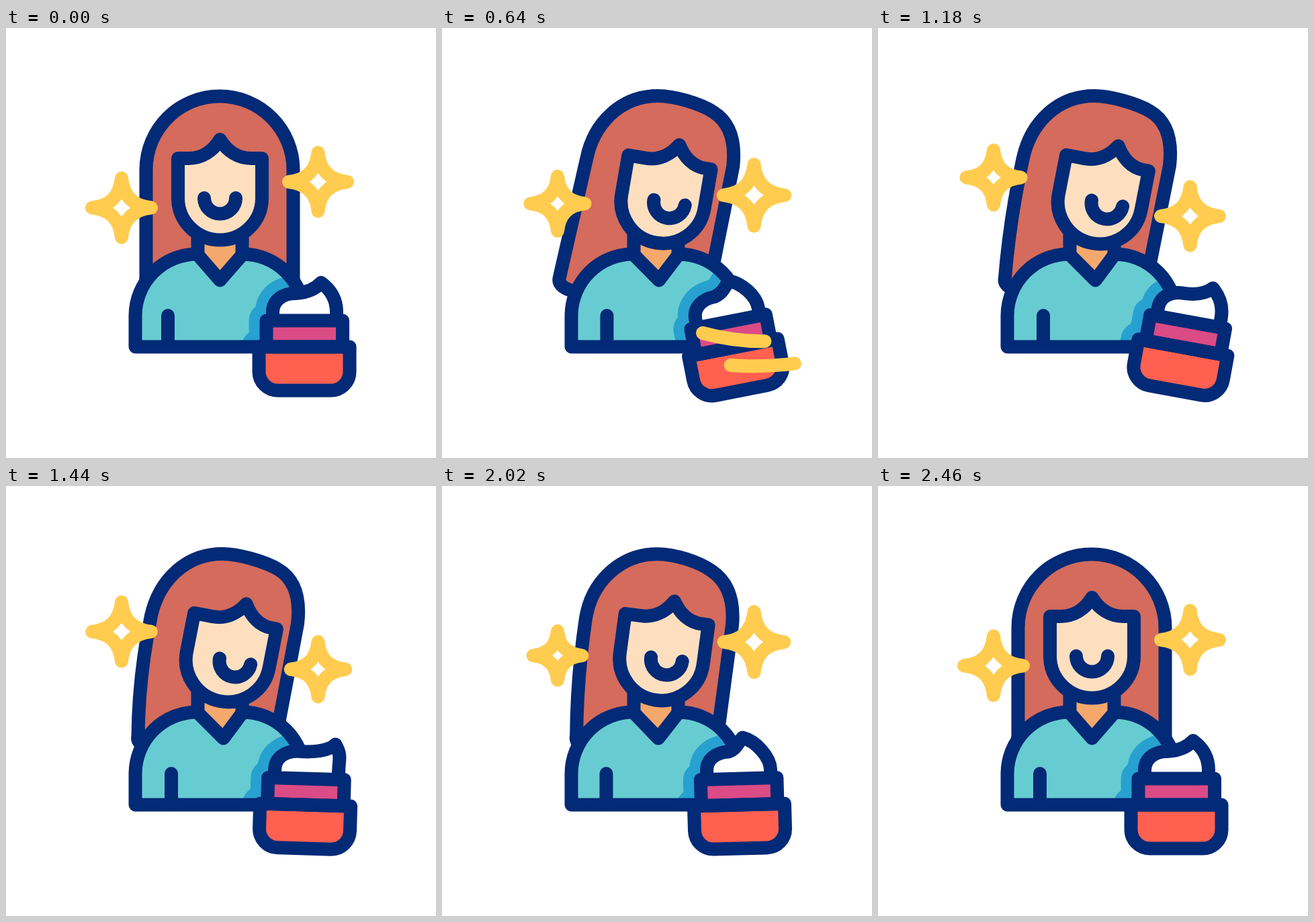
These frames come from a looping animation (640 by 640 pixels, 3000 ms). An HTML page:

```html
<!DOCTYPE html>
<html lang="en">
<head>
<meta charset="utf-8">
<title>Skin care</title>
<style>
html, body { margin: 0; width: 100%; height: 100%; overflow: hidden; background: #fff; }
svg { display: block; width: 100vw; height: 100vh; }
</style>
</head>
<body>
<svg viewBox="0 0 640 640" fill="none" stroke="#032a76" stroke-width="20" stroke-linecap="round" stroke-linejoin="round">
  <defs>
    <clipPath id="shirtClip"><path id="shirtArea"/></clipPath>
    <g id="jarLines">
      <path id="creamLine"/>
      <path d="M387.5 435.5H501V474.5H387.5Z"/>
      <path d="M376.5 474.5H511.5V511.5a28 28 0 0 1 -28 28H404.5a28 28 0 0 1 -28 -28Z"/>
    </g>
  </defs>

  <path id="hair" fill="#d46b5c"/>

  <path id="neck" fill="#f5a86b" stroke="none"/>
  <path d="M285.5 306V336M351.5 306V336"/>

  <g id="head">
    <path id="face" fill="#fddfbf"/>
    <path id="smile" d="M295 253a23.5 23.5 0 0 0 47 0"/>
  </g>

  <path id="shirt" fill="#67ccd1" stroke="none"/>
  <g clip-path="url(#shirtClip)">
    <use id="shade" href="#jarLines" stroke="#27a1cf" stroke-width="52"/>
  </g>
  <path id="shirtLine"/>
  <path id="arm"/>

  <g id="jar">
    <path id="cream" fill="#fff" stroke="none"/>
    <path d="M387.5 435.5H501V474.5H387.5Z" fill="#db4b86" stroke="none"/>
    <path d="M376.5 474.5H511.5V511.5a28 28 0 0 1 -28 28H404.5a28 28 0 0 1 -28 -28Z" fill="#ff6050" stroke="none"/>
    <use href="#jarLines"/>
  </g>

  <g stroke="#ffcc50">
    <path id="starL" fill="#fff"/>
    <path id="starR" fill="#fff"/>
    <path id="swipeA" pathLength="1" d="M560 455Q475 478 388 454"/>
    <path id="swipeB" pathLength="1" d="M534 498Q470 508 400 499"/>
  </g>
</svg>
<script>
const LOOP = 3000;
const $ = id => document.getElementById(id);
const set = (id, d) => $(id).setAttribute('d', d);
const turn = (id, deg, x, y) => $(id).setAttribute('transform', `rotate(${deg} ${x} ${y})`);
const ease = p => (1 - Math.cos(Math.PI * Math.min(1, Math.max(0, p)))) / 2;
const ramp = (t, from, to) => ease((t - from) / (to - from));

// Eased value through [time, value] keys
function track(t, keys) {
  let v = keys[0][1];
  for (let i = 1; i < keys.length; i++) {
    const [t0, v0] = keys[i - 1], [t1, v1] = keys[i];
    if (t > t0) v = v0 + (v1 - v0) * ramp(t, t0, t1);
  }
  return v;
}

const HAIR_REST = [208.5,211, 208.5,150.5, 257.5,101.5, 318,101.5, 347,101.5, 375,113.1, 395.4,133.6, 415.9,154.1, 427.5,182, 427.5,211];
const HAIR_TILT = [216,193, 228,140, 268,101, 322,101, 345,101, 385,112, 405,124, 432,140, 438,170, 434,205];

function drawHead(t) {
  const k = track(t, [[220, 0], [760, 1], [1820, 1], [2360, 0]]);
  const swing = track(t, [[220, 0], [740, -37], [1440, -12], [1820, -12], [2360, 0]]);
  const lag = swing + 37 * k;

  const p = HAIR_REST.map((v, i) => v + (HAIR_TILT[i] - v) * k);
  const ex = 208.5 + swing;
  const mx = (p[0] + ex) / 2 - 0.35 * lag, my = (p[1] + 372) / 2;
  const rx = 427.5 - 26 * k + 0.2 * lag;
  set('hair', `M${ex + 18} 391Q${ex - 3} 384 ${ex} 372Q${mx} ${my} ${p[0]} ${p[1]}`
    + `C${p.slice(2, 8)}C${p.slice(8, 14)}C${p.slice(14)}L${rx} 350L${rx - 8 * k} 385`);

  turn('head', 11 * k, 294, 317);
  const s = 11 * k;
  set('face', `M256 194H${272 + s}C${292 + s} 194 ${308 + s} 183 ${318.5 + s} 166`
    + `C${329 + s} 183 ${345 + 0.9 * s} 194 ${365 + 0.7 * s} 194H381V253A62.5 62.5 0 0 1 256 253Z`);
  $('smile').setAttribute('transform', `translate(${s} 0)`);

  const vx = 318.5 + 5 * k;
  const body = `M192.5 474.5V428A92 92 0 0 1 284.5 336.5L${vx} 375.5L352.5 336.5A92 92 0 0 1 444 428V474.5Z`;
  for (const id of ['shirt', 'shirtArea', 'shirtLine']) set(id, body);
  set('neck', `M285.5 306H351.5V336L${vx} 375.5L285.5 336Z`);
  set('arm', `M${241 + 5 * k} 428V470`);
}

function drawJar(t) {
  const a = track(t, [[220, 0], [700, -11.5], [1240, 11], [1660, -9], [2160, 0]]);
  const dx = track(t, [[220, 0], [800, -15], [880, -15], [1440, 17], [1960, -18], [2460, 0]]);
  const x = 469 + dx, y = 379 + 0.25 * dx;
  const d = `M397 435V423C397 406 411 395 431 395`
    + `C${447 + 0.3 * dx} ${394 + 0.15 * dx} ${x - 9} ${y + 10} ${x} ${y}`
    + `C${x + 15 - 0.3 * dx} ${y + 11 + 0.3 * dx} 492 405 492 423V435`;
  set('cream', d);
  set('creamLine', d);
  turn('jar', a, 444, 530);
  turn('shade', a, 444, 530);
}

function star(id, cx, cy, r) {
  const k = r / 44, a = 3 * k, b = 17 * k;
  const pt = (x, y) => `${cx + x} ${cy + y} `;
  set(id, 'M' + pt(0, -r)
    + 'C' + pt(a, -b) + pt(b, -a) + pt(r, 0)
    + 'C' + pt(b, a) + pt(a, b) + pt(0, r)
    + 'C' + pt(-a, b) + pt(-b, a) + pt(-r, 0)
    + 'C' + pt(-b, -a) + pt(-a, -b) + pt(0, -r) + 'Z');
}

// There and back, 980 ms each way
const bob = (t, from) => ramp(t, from, from + 980) - ramp(t, from + 980, from + 1960);

function drawStars(t) {
  const l = bob(t, 420), r = bob(t, 220);
  star('starL', 172, 267.5 - 51 * l, 44 - 9.5 * Math.sin(Math.PI * l));
  star('starR', 464.5, 229 + 51 * r, 43.5 + 3.5 * Math.sin(2 * Math.PI * r));
}

function swipe(id, head, tail) {
  const el = $(id), on = head > 0 && tail < 1;
  el.style.display = on ? '' : 'none';
  el.setAttribute('stroke-dasharray', `${Math.max(0.002, head - tail)} 3`);
  el.setAttribute('stroke-dashoffset', -tail);
}

function draw(t) {
  drawHead(t);
  drawJar(t);
  drawStars(t);
  swipe('swipeA', ramp(t, 240, 490), ramp(t, 460, 840));
  swipe('swipeB', ramp(t, 400, 750), ramp(t, 580, 940));
}

function tick() {
  draw(performance.now() % LOOP);
  requestAnimationFrame(tick);
}
tick();
</script>
</body>
</html>
```
